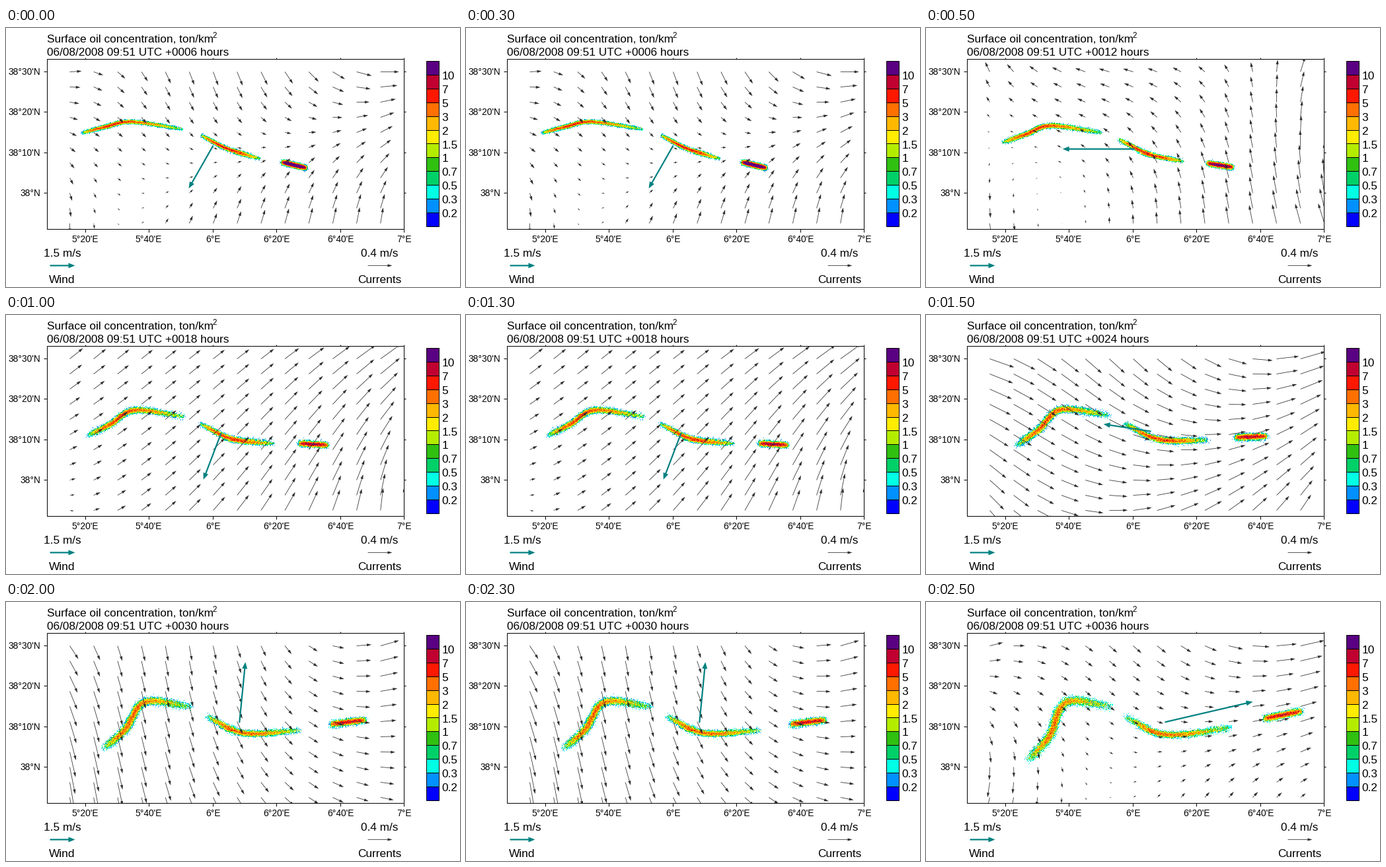
Animation, 687 px wide and 393 px high, one loop 3 s. Source, as a matplotlib script:

```python
import numpy as np
import matplotlib
matplotlib.rcParams["toolbar"] = "None"
import matplotlib.pyplot as plt
from matplotlib.animation import FuncAnimation
from matplotlib.patches import Rectangle

W, H = 687, 393
TEAL, GREY = "#008080", "#303030"
LEVELS = [0.2, 0.3, 0.5, 0.7, 1, 1.5, 2, 3, 5, 7, 10]
COLORS = ["#0000ff", "#0090ff", "#00ffe4", "#00d068", "#30c010", "#b4ec00",
          "#ffec00", "#ffb800", "#ff7000", "#ff1800", "#c00030", "#5a0082"]
RGBA = np.array([matplotlib.colors.to_rgba(c) for c in COLORS])

# Vectors are complex, y pointing down. Each state: wind, then the currents
# at the left, middle and right of the top row and of the bottom row.
STATES = [
    (-37+65j, (18-1j, 8+21j, 28), (15j, 6-17j, 4-24j)),
    (-109, (-7-15j, -15-5j, 7-23j), (2+18j, -1-16j, -8-30j)),
    (-27+71j, (20-16j, 18-14j, 32-23j), (6+1j, 18-22j, 4-34j)),
    (-72-11j, (37+13j, 23+20j, 38-11j), (20+23j, 28-6j, 16-24j)),
    (9-92j, (13+20j, 5+20j, 28-8j), (7+46j, 11+20j, 20+4j)),
    (133-31j, (20-5j, 13+11j, 36-8j), (-6+26j, 5-4j, 8-6j)),
]

plt.rcParams["font.family"] = "Liberation Sans"
fig = plt.figure(figsize=((W + 0.001) / 72, (H + 0.001) / 72), dpi=72,
                 facecolor="white")
ax = fig.add_axes([0, 0, 1, 1])
ax.axis("off")


def label(x, y, s, size=17.2, ha="left"):
    return ax.text(x, y, s, size=size, ha=ha, va="baseline", color="black")


def line(x, y):
    ax.plot(x, y, color="black", lw=1, solid_capstyle="butt")


def box(x, y, w, h, **kw):
    return ax.add_patch(Rectangle((x, y), w, h, ec="black", lw=1, **kw))


def arrows(tail, vec, color, width, head, zorder):
    """Arrows from complex tails; head is (length, breadth) in pixels."""
    tail, vec = np.atleast_1d(tail) + 0.5 + 0.5j, np.atleast_1d(vec)
    return ax.quiver(tail.real, tail.imag, vec.real, vec.imag, color=color,
                     angles="xy", scale_units="xy", scale=1, units="dots",
                     width=width, minlength=0.5, minshaft=1.6, zorder=zorder,
                     headlength=head[0] / width, headwidth=head[1] / width,
                     headaxislength=head[0] / width)


def wind_arrow(tail, vec):
    return arrows(tail, vec, TEAL, 2.2, (10, 8), 6)


def current_arrows(tail, vec):
    return arrows(tail, vec, GREY, 0.8, (7, 4.2), 5)


# Currents: quadratic across the map, linear down it
COL, ROW = np.meshgrid(np.arange(15), np.arange(11))
TAILS = 96 + 36.17 * COL + 1j * (66 + 23 * ROW)


def currents(top, bottom):
    p, q = COL / 6.5 - 1, ROW / 10

    def across(a, b, c):
        return a * p * (p - 1) / 2 + b * (1 - p * p) + c * p * (p + 1) / 2

    return across(*top) * (1 - q) + across(*bottom) * q


def drift(start, end, i):
    """Points carried from start to end, with a shared inertial wobble."""
    a, b = np.array(start, float), np.array(end, float)
    wobble = [-4 * np.sin(2 * np.pi * i / 5),
              4 * np.cos(2 * np.pi * (i - 1) / 3.4) - 1]
    return a + (b - a) * (i / 5) ** 1.3 + wobble


# Oil slicks: particle counts around smooth centre lines
X0, X1, Y0, Y1 = 100, 580, 125, 255
PX, PY = np.meshgrid(np.arange(X0, X1), np.arange(Y0, Y1))


def curve(pts, trim, n=70):
    """Catmull-Rom curve through pts, shortened a little at both ends."""
    p = np.vstack([2 * pts[0] - pts[1], pts, 2 * pts[-1] - pts[-2]])
    t = np.linspace(trim, 1 - trim, n) * (len(pts) - 1)
    k = np.minimum(t.astype(int), len(pts) - 2)
    t = (t - k)[:, None]
    a, b, c, d = (p[k + j] for j in range(4))
    return b + 0.5 * t * (c - a + t * (2 * a - 5 * b + 4 * c - d
                                       + t * (3 * (b - c) + d - a)))


def slick(pts, peak, width, ends=0.12, power=1.0, trim=0.02):
    path = curve(pts, trim)
    dist2 = np.full(PX.shape, 1e9)
    pos = np.zeros(PX.shape)
    for s, (x, y) in zip(np.linspace(0, 1, len(path)), path):
        d2 = (PX - x) ** 2 + (PY - y) ** 2
        near = d2 < dist2
        dist2[near], pos[near] = d2[near], s
    along = ends + (1 - ends) * np.sin(np.pi * pos ** 0.9) ** power
    return peak * along * np.exp(-dist2 / (2 * width ** 2))


def oil(i):
    rng = np.random.default_rng(i)
    west = drift([(114, 162), (150, 152.5), (190, 145), (270, 156.5)],
                 [(154, 239), (186, 203), (212, 152), (280, 158)], i)
    middle = drift([(294, 165), (335, 186), (383, 200)],
                   [(301, 174), (362, 200), (460, 190)], i)
    east = drift([(416, 205), (453, 214)], [(509, 177), (568, 165)], i)
    dens = (slick(west, 6.5 - 0.5 * i, 1.5 + 0.3 * i)
            + slick(middle, 6.8 - 0.55 * i, 1.5 + 0.15 * i)
            + slick(east, 7 + 13 * 0.45 ** i, 1.8 + 0.1 * i, 0.5, 0.5, 0.07))
    unit = 0.12 + 0.045 * i
    dens = unit * rng.poisson(dens / unit)
    dens = dens * np.exp(0.2 * rng.standard_normal(dens.shape))
    img = RGBA[np.digitize(dens, LEVELS)]
    img[dens < LEVELS[0]] = 0
    return img


# Fixed parts
frame = box(62, 47, 540, 258, fc="none", zorder=4)
for x, s in zip(np.linspace(120, 602, 6).round(),
                ["5°20'E", "5°40'E", "6°E", "6°20'E", "6°40'E", "7°E"]):
    line([x, x], [305, 310])
    line([x, x], [45, 47])
    label(x, 324.7, s, 13.8, "center")
for y, s in zip([66, 127, 189, 250], ["38°30'N", "38°20'N", "38°10'N", "38°N"]):
    line([57, 62], [y, y])
    line([602, 605], [y, y])
    label(52, y + 5, s, 13.8, "right")

label(61.5, 21.7, "Surface oil concentration, ton/km")
label(312, 14.5, "2", 11.5)
stamp = label(61.5, 42, "")
label(85, 346.5, "1.5 m/s", ha="center")
label(85, 386.7, "Wind", ha="center")
label(565.5, 346.5, "0.4 m/s", ha="center")
label(565, 386.7, "Currents", ha="center")
wind_arrow(66 + 360j, 38)
current_arrows(547 + 360j, 37)

step = 251 / 12
for i, c in enumerate(reversed(COLORS)):
    box(636, 50 + i * step, 19, step, fc=c)
for i, v in enumerate(reversed(LEVELS)):
    label(659.5, 50 + (i + 1) * step + 7, f"{v:g}", 17.2)

scenes = []
for i, (wind, top, bottom) in enumerate(STATES):
    img = ax.imshow(oil(i), extent=(X0, X1, Y1, Y0), aspect="auto",
                    interpolation="nearest", zorder=3)
    field = current_arrows(TAILS, currents(top, bottom))
    field.set_clip_path(frame)
    x, y = drift((313, 180), (361, 181), i)
    scenes.append([img, field, wind_arrow(x + 1j * y, wind)])

ax.set_xlim(0, W)
ax.set_ylim(H, 0)


def draw(i):
    for k, parts in enumerate(scenes):
        for part in parts:
            part.set_visible(k == i)
    stamp.set_text(f"06/08/2008 09:51 UTC +{6 * (i + 1):04d} hours")
    return [stamp]


anim = FuncAnimation(fig, draw, frames=len(scenes), interval=500,
                     init_func=lambda: draw(0), repeat=True)
plt.show()
```
